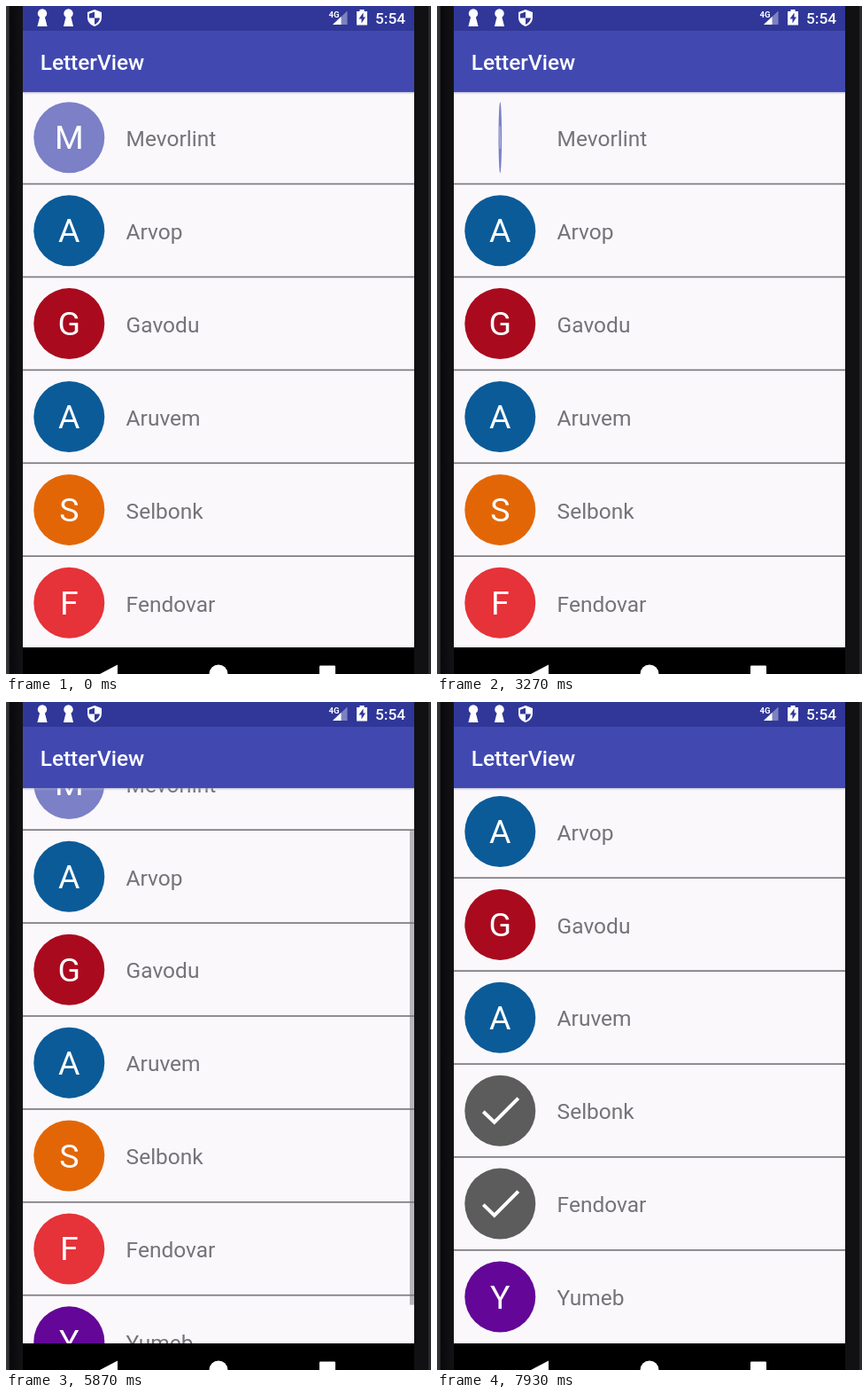
These frames come from a looping animation (480 px wide and 753 px high, 8 s). An HTML page:

```html
<!DOCTYPE html>
<html lang="en">
<head>
<meta charset="utf-8">
<title>LetterView</title>
<style>
  html, body { margin: 0; width: 100%; height: 100%; overflow: hidden; background: #101012; }
  svg { display: block; width: 100%; height: 100%; font-family: Roboto, "Open Sans", sans-serif; }
  .name { font-size: 24.5px; fill: #757378; }
  .letter { font-size: 37.5px; fill: #fff; text-anchor: middle; }
  .tick { fill: none; stroke: #fff; stroke-width: 4; }
</style>
</head>
<body>
<svg viewBox="0 0 480 753">
  <defs>
    <clipPath id="view"><rect x="19" y="97" width="442" height="626"/></clipPath>
    <linearGradient id="shade" x2="0" y2="1">
      <stop stop-color="#8e91bd" stop-opacity=".6"/>
      <stop offset="1" stop-color="#c8c6d4" stop-opacity="0"/>
    </linearGradient>
    <linearGradient id="edge">
      <stop stop-color="#39393b"/>
      <stop offset=".16" stop-color="#303032"/>
      <stop offset=".24" stop-color="#09090b"/>
      <stop offset="1" stop-color="#131315"/>
    </linearGradient>
    <g id="keyhole" fill="#fff">
      <circle cy="8.4" r="5.2"/>
      <path d="M-2.5 11H2.5L5.6 23H-5.6Z"/>
    </g>
  </defs>

  <rect width="480" height="753" fill="#111113"/>
  <rect width="19" height="753" fill="url(#edge)"/>
  <rect x="477" width="3" height="753" fill="#29292b"/>
  <rect x="19" width="442" height="753" fill="#faf8fb"/>

  <g clip-path="url(#view)">
    <g id="list"></g>
    <rect id="bar" x="456" width="5" fill="#77747b"/>
  </g>

  <rect x="19" y="97" width="442" height="3" fill="url(#shade)"/>
  <rect x="19" y="27" width="442" height="70" fill="#4149b1"/>
  <rect x="19" width="442" height="28" fill="#303799"/>
  <text x="38.7" y="71.5" font-size="24.4" font-weight="500" fill="#fff">LetterView</text>

  <use href="#keyhole" x="41"/>
  <use href="#keyhole" x="70.5"/>
  <path d="M100 4L108 7V13C108 18 104.5 21.5 100 23C95.500 21.500 92 18 92 13V7Z" fill="#fff"/>
  <path d="M100 6.500V13.500H106C105.500 17 103 19.700 100 21V13.500H94V8.700Z" fill="#303799"/>
  <path d="M385.500 5.500V21H369Z" fill="#7d82bf"/>
  <path d="M378.500 12V21H369Z" fill="#fff"/>
  <text x="364.500" y="12.500" font-size="9.500" font-weight="700" fill="#fff">4G</text>
  <path d="M396 6H399.500V4H404.500V6H408V21.500H396Z" fill="#fff"/>
  <path d="M403.500 7.500L398.500 14.500H401.500V19.500L406 12.500H403.500Z" fill="#303799"/>
  <text x="417" y="19.500" font-size="17.300" font-weight="500" fill="#fff">5:54</text>

  <rect x="19" y="723" width="442" height="30" fill="#000"/>
  <g fill="#fff">
    <path d="M106 753L126 742.500V763.500Z"/>
    <circle cx="240" cy="753" r="10.500"/>
    <rect x="354" y="743.500" width="18" height="18" rx="1"/>
  </g>
</svg>
<script>
const LOOP = 8000, FRAME = 1000 / 15, FLIP = 300;
const PITCH = 104.9, TOP = 97, HEIGHT = 626, MAX_SCROLL = 107.2;
const SCROLL_START = 5725, SCROLL_TIME = 455;

// Each flip time toggles a row between its letter and the tick.
const rows = [
  { name: "Mevorlint", color: "#7b80c7", flips: [3121, 4250] },
  { name: "Arvop", color: "#0b5b99", flips: [] },
  { name: "Gavodu", color: "#aa0a1e", flips: [] },
  { name: "Aruvem", color: "#0b5b99", flips: [] },
  { name: "Selbonk", color: "#e36606", flips: [6950] },
  { name: "Fendovar", color: "#e63239", flips: [7480] },
  { name: "Yumeb", color: "#640698", flips: [] }
];

const list = document.getElementById("list");
const bar = document.getElementById("bar");
const clamp = v => Math.max(0, Math.min(1, v));

function add(parent, tag, attrs, text = "") {
  const el = document.createElementNS("http://www.w3.org/2000/svg", tag);
  for (const key in attrs) el.setAttribute(key, attrs[key]);
  el.textContent = text;
  return parent.appendChild(el);
}

rows.forEach((row, i) => {
  const y = 148.3 + i * PITCH;
  row.y = y;
  row.badge = add(list, "g", {});
  row.disc = add(row.badge, "circle", { r: 40 });
  row.letter = add(row.badge, "text", { class: "letter", y: 13 }, row.name[0]);
  row.tick = add(row.badge, "path", { class: "tick", d: "M-19 1L-6.5 13L20.500 -14" });
  add(list, "text", { class: "name", x: 135.6, y: y + 9.7 }, row.name);
  if (i < rows.length - 1)
    add(list, "rect", { x: 19, y: y + 51.4, width: 442, height: 1.7, fill: "#7d7a80" });
});

function drawBadge(row, t) {
  let checked = false, scale = 1;
  for (const start of row.flips) {
    const p = clamp((t - start) / FLIP);
    if (p > 0.5) checked = !checked;
    if (p > 0 && p < 1) scale = Math.abs(Math.cos(Math.PI * p));
  }
  row.badge.setAttribute("transform", `translate(71.3 ${row.y}) scale(${scale} 1)`);
  row.disc.setAttribute("fill", checked ? "#5c5c5c" : row.color);
  row.letter.style.display = checked ? "none" : "";
  row.tick.style.display = checked ? "" : "none";
}

function draw(t) {
  const p = clamp((t - SCROLL_START) / SCROLL_TIME);
  const scroll = MAX_SCROLL * (1 - (1 - p) ** 2);
  list.setAttribute("transform", `translate(0 ${-scroll})`);

  const ratio = HEIGHT / (HEIGHT + MAX_SCROLL);
  const fade = clamp((t - SCROLL_START - SCROLL_TIME - 270) / 250);
  bar.setAttribute("y", TOP + scroll * ratio);
  bar.setAttribute("height", HEIGHT * ratio);
  bar.setAttribute("opacity", p > 0 ? 0.5 * (1 - fade) : 0);

  rows.forEach(row => drawBadge(row, t));
}

function tick() {
  const t = performance.now() % LOOP;
  draw(Math.floor((t + 4) / FRAME) * FRAME % LOOP);
  requestAnimationFrame(tick);
}
tick();
</script>
</body>
</html>
```
